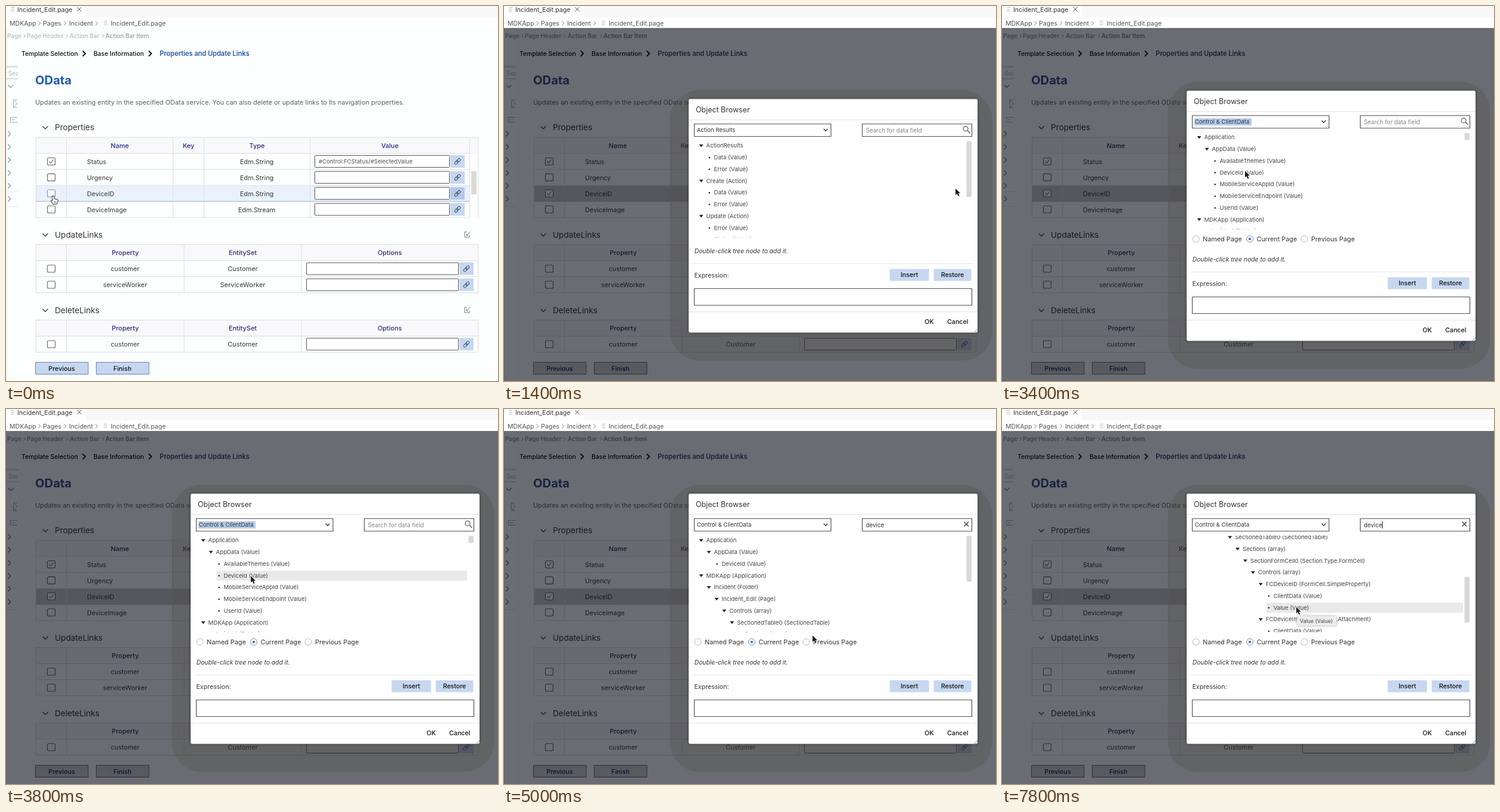
An HTML page with a canvas for the animation above (8 s loop, 826 px wide and 631 px high).

```html
<!DOCTYPE html>
<html lang="en">
<head>
<meta charset="utf-8">
<title>Object Browser</title>
<style>
html, body { margin: 0; width: 100%; height: 100%; overflow: hidden; background: #fff; }
canvas { display: block; }
</style>
</head>
<body>
<canvas id="stage" width="826" height="631"></canvas>
<script>
const ctx = document.getElementById('stage').getContext('2d');
const LOOP = 8000, STEP = 200, ROW = 19.75;
const INK = '#383838', PALE = '#c6d7ef', GRID = '#dcdde3';
// Accents lose most of their colour while the page is dimmed.
const BRIGHT = { head: '#2a2b86', title: '#1f5ab0', step: '#1f5ab0', arrow: '#6f9bc9', row: '#e9f2fc',
  button: PALE, edge: '#6685b8', label: '#111', crumb: '#bcc5c6', lastCrumb: '#a0a9aa' };
const DIMMED = { head: '#30304a', title: '#36507f', step: '#334766', arrow: '#6f747a', row: '#cdcbc8',
  button: '#d2d3d0', edge: '#6c6c6c', label: '#10205c', crumb: '#90979a', lastCrumb: '#7c8486' };
let look = BRIGHT;

// ---------- drawing helpers ----------
function text(str, x, y, size = 10.85, color = INK, style = '400', align = 'left') {
  ctx.font = `${style} ${size}px Inter, sans-serif`;
  ctx.fillStyle = color;
  ctx.textAlign = align;
  ctx.fillText(str, x, y + size * 0.36);
}
function fill(x, y, w, h, color) {
  ctx.fillStyle = color;
  ctx.fillRect(x, y, w, h);
}
function box(x, y, w, h, border, color, radius = 0, width = 1) {
  ctx.beginPath();
  ctx.roundRect(x + 0.5, y + 0.5, w - 1, h - 1, radius);
  if (color) { ctx.fillStyle = color; ctx.fill(); }
  if (border) { ctx.strokeStyle = border; ctx.lineWidth = width; ctx.stroke(); }
}
function line(points, color, width = 1) {
  ctx.beginPath();
  for (let i = 0; i < points.length; i += 2) ctx.lineTo(points[i], points[i + 1]);
  ctx.strokeStyle = color;
  ctx.lineWidth = width;
  ctx.stroke();
}
function shape(points, color, outline) {
  ctx.beginPath();
  for (let i = 0; i < points.length; i += 2) ctx.lineTo(points[i], points[i + 1]);
  ctx.closePath();
  if (outline) { ctx.strokeStyle = outline; ctx.lineWidth = 2; ctx.stroke(); }
  ctx.fillStyle = color;
  ctx.fill();
}
const chevronRight = (x, y, s, color, w) => line([x - s / 2, y - s, x + s / 2, y, x - s / 2, y + s], color, w);
const chevronDown = (x, y, s, color, w) => line([x - s, y - s / 2, x, y + s / 2, x + s, y - s / 2], color, w);

function linkButton(x, y, bg = PALE, ink = '#3b4a63') {
  fill(x, y - 10.5, 24, 21, bg);
  ctx.save();
  ctx.translate(x + 12, y);
  ctx.rotate(-Math.PI / 4);
  box(-6.5, -2.5, 8, 5, ink, null, 2.2);
  box(-1.5, -2.5, 8, 5, ink, null, 2.2);
  ctx.restore();
}
function checkbox(y, checked, border = '#666') {
  box(69, y - 6.5, 14, 13, border, '#fff', 2, 1.1);
  if (checked) line([72.5, y, 75, y + 2.8, 79.5, y - 3.2], '#777', 1.3);
}

// ---------- wizard page ----------
function grid(y, rows, columns, titles) {
  const bottom = y + 27 * (rows + 1);
  fill(50, y, 742, 27, '#f9f9fc');
  for (let i = 0; i <= rows + 1; i++) line([50, y + 27 * i, columns.at(-1), y + 27 * i], GRID);
  for (const x of columns) line([x, y, x, bottom], GRID);
  line([columns.at(-1), y, 792.5, y, 792.5, bottom], GRID);
  titles.forEach((title, i) => text(title, (columns[i + 1] + columns[i + 2]) / 2, y + 14, 10.95, look.head, '500', 'center'));
}
function section(title, y) {
  chevronDown(66, y, 4.5, '#444', 1.3);
  text(title, 82, y, 13.6, '#333');
}
function linkSection(title, y, names) {
  section(title, y);
  line([774, y - 5, 770, y - 5, 770, y + 4, 778, y + 4, 778, y + 1], '#777');
  line([779, y - 5, 773, y + 1, 776, y + 1], '#777');
  line([773, y - 2, 773, y + 1], '#777');
  grid(y + 16.5, names.length, [50.5, 101.5, 299, 496, 792.5], ['Property', 'EntitySet', 'Options']);
  names.forEach((name, i) => {
    const cy = y + 57 + 27 * i;
    checkbox(cy, false);
    text(name, 200, cy + 0.5, 10.85, INK, '400', 'center');
    text(name[0].toUpperCase() + name.slice(1), 397.5, cy + 0.5, 10.95, INK, '400', 'center');
    box(504, cy - 10.5, 256, 21, '#555', '#fff', 1);
    linkButton(761, cy);
  });
}
function sidebar() {
  fill(0, 37, 20, 594, '#fbffff');
  for (const y of [100, 312, 337]) line([0, y + 0.5, 20, y + 0.5], '#e3e8ea');
  line([20, 102.5, 0.5, 102.5, 0.5, 122.5, 20, 122.5], '#b9bdbf');
  ctx.save();
  ctx.beginPath();
  ctx.rect(0, 100, 20, 40);
  ctx.clip();
  text('Search', 4, 113, 10, '#b5b5b5');
  ctx.restore();
  chevronDown(8, 135, 4.5, look.arrow, 1.2);
  line([19, 158, 12.5, 158, 12.5, 171, 19, 171], '#a3aab0');
  line([13, 158, 19, 164, 13, 171], '#a3aab0');
  line([19, 187.5, 7.5, 187.5, 7.5, 195.5, 19, 195.5], '#a3aab0');
  line([10, 191.5, 15, 191.5], '#a3aab0');
  for (const y of [215, 237, 259, 281, 302.5, 324.5]) chevronRight(5.5, y, 4.5, look.arrow, 1.2);
}
function editorTop() {
  fill(0, 0, 826, 37, '#fff');
  fill(134, 0, 692, 19, '#f8f8f8');
  for (const [x, y] of [[8, 6], [164, 29]])
    for (const dy of [-3, 0, 3]) line([x, y + dy - 0.5, x + 6, y + dy - 0.5], '#bbb');
  text('Incident_Edit.page', 19, 5.7, 10.6, '#333');
  line([119.5, 2, 126.5, 9], '#444');
  line([126.5, 2, 119.5, 9], '#444');
  const crumbs = [['MDKApp', 6, 56], ['Pages', 62, 99], ['Incident', 106, 152], ['Incident_Edit.page', 176, 0]];
  for (const [name, x, arrow] of crumbs) {
    text(name, x, 29, 10.55, '#555');
    if (arrow) chevronRight(arrow, 29, 3.5, '#777');
  }
}
function wizard(t) {
  look = t >= 1400 ? DIMMED : BRIGHT;
  fill(0, 0, 826, 631, '#fdfefe');
  fill(0, 37, 826, 28, '#fbfffe');
  sidebar();
  fill(0, 37, 1, 594, '#f4e8d4');
  const trail = [['Page', 2, 31], ['Page Header', 35, 102], ['Action Bar', 107, 163], ['Action Bar Item', 167, 0]];
  for (const [name, x, arrow] of trail) {
    text(name, x, 50.5, 9.9, arrow ? look.crumb : look.lastCrumb, '600');
    if (arrow) chevronRight(arrow, 50.5, 2.8, look.lastCrumb);
  }
  text('Template Selection', 26, 80, 10.4, '#111', '500');
  chevronRight(131, 80, 4.5, '#111', 1.8);
  text('Base Information', 147, 80, 10.45, '#111', '500');
  chevronRight(242, 80, 4.5, '#111', 1.8);
  text('Properties and Update Links', 258, 80, 11.05, look.step, '600');
  text('OData', 49, 125.2, 20.2, look.title, '700');
  text('Updates an existing entity in the specified OData service. You can also delete or update links to its navigation properties.',
    49, 162, 10.9, '#5f5f5f');

  section('Properties', 204.5);
  fill(50, 302, 728, 27, look.row);
  grid(221, 4, [50.5, 101.5, 280.5, 332.5, 510.5, 778.5], ['Name', 'Key', 'Type', 'Value']);
  line([50, 328.5, 778, 328.5], '#a9bcd6');
  ['Status', 'Urgency', 'DeviceID', 'DeviceImage'].forEach((name, i) => {
    const y = 261.5 + 26.9 * i, active = i === 2;
    checkbox(y, i === 0 || (active && t >= 200), active && t < 400 ? '#6f90bd' : '#666');
    text(name, 136, y + 0.5);
    text(i < 3 ? 'Edm.String' : 'Edm.Stream', 421, y + 0.5, 10.95, INK, '400', 'center');
    box(518, y - 10.5, 227, 21, '#555', '#fff', 1);
    if (active && t === 1200) linkButton(746, y, '#1f56a8', '#fff');
    else linkButton(746, y, active ? '#b4c9e8' : PALE);
  });
  text('#Control:FCStatus/#SelectedValue', 525, 262, 9.6, '#555');
  fill(781, 278, 9, 39, '#d9d9d9');
  linkSection('UpdateLinks', 385, ['customer', 'serviceWorker']);
  linkSection('DeleteLinks', 512, ['customer']);
  for (const [name, x] of [['Previous', 49], ['Finish', 151]]) {
    box(x, 599, 89.5, 21, look.edge, look.button);
    text(name, x + 44.5, 610, 10.7, look.label, '500', 'center');
  }
}

// ---------- object browser ----------
// Tree entries are "depth label"; a trailing ":" marks an expanded node.
const resultTree = ['0 ActionResults:', '1 Data (Value)', '1 Error (Value)', '0 Create (Action):', '1 Data (Value)', '1 Error (Value)',
  '0 Update (Action):', '1 Error (Value)', '1 Status (Value)'];
const clientTree = ['0 Application:', '1 AppData (Value):', '2 AvailableThemes (Value)', '2 DeviceId (Value)',
  '2 MobileServiceAppId (Value)', '2 MobileServiceEndpoint (Value)', '2 UserId (Value)', '0 MDKApp (Application):',
  '1 Incident (Folder):'];
const filteredTree = ['0 Application:', '1 AppData (Value):', '2 DeviceId (Value)', '0 MDKApp (Application):',
  '1 Incident (Folder):', '2 Incident_Edit (Page):', '3 Controls (array):', '4 SectionedTable0 (SectionedTable):',
  '5 Sections (array):', '6 SectionFormCell0 (Section.Type.FormCell):', '7 Controls (array):',
  '8 FCDeviceID (FormCell.SimpleProperty):', '9 ClientData (Value)', '9 Value (Value)',
  '8 FCDeviceImage (FormCell.Attachment):', '9 ClientData (Value)', '9 Value (Value)'];
const choices = ['OData Functions Result', 'Action Results', 'OData Objects', 'Control & ClientData', 'Rules',
  'Global Data', 'Array Initialization', 'i18n Objects', 'Expressions'];

function tree(items, top, scroll, hovered) {
  ctx.save();
  ctx.beginPath();
  ctx.rect(312, top + 71, 464, 162.5);
  ctx.clip();
  items.forEach((item, i) => {
    const depth = +item[0], open = item.endsWith(':');
    const x = 339.6 + 12.9 * depth, y = top + 79 + ROW * i - scroll;
    if (i === hovered) fill(x - 12, y - 8.5, 774 - x + 12, 17, '#e9e9e9');
    if (open) shape([x - 12, y - 2, x - 5, y - 2, x - 8.5, y + 2.5], '#222');
    else box(x - 9.5, y - 1.5, 3.6, 3.6, null, '#222', 1.3);
    text(item.slice(2).replace(/:$/, ''), x, y, 9.6, '#444');
  });
  ctx.restore();
}
function radio(x, y, label, on) {
  ctx.beginPath();
  ctx.arc(x, y, 5.5, 0, 7);
  ctx.strokeStyle = on ? '#6a8fc0' : '#b5b5b5';
  ctx.lineWidth = 1;
  ctx.stroke();
  if (on) box(x - 2.5, y - 2.5, 5, 5, null, '#2c62ad', 2);
  text(label, x + 11.5, y, 10.85, '#333');
}
function searchBox(t, top) {
  const typed = 'device'.slice(0, t < 4400 ? 0 : t < 4600 ? 3 : 6);
  box(601, top + 42, 185, 22, '#555', '#fff', 0, 1.2);
  text(typed || 'Search for data field', 607.5, top + 53, 9.8, typed ? '#333' : '#858585');
  if (typed) {
    line([772.5, top + 48, 780, top + 55.5], '#333', 1.3);
    line([780, top + 48, 772.5, top + 55.5], '#333', 1.3);
  } else {
    ctx.beginPath();
    ctx.arc(775, top + 50.5, 4, 0, 7);
    ctx.strokeStyle = '#666';
    ctx.lineWidth = 1.3;
    ctx.stroke();
    line([778, top + 53.5, 782.5, top + 58], '#666', 1.6);
  }
  const caret = (t >= 4200 && t < 4800) || (t >= 5400 && t < 6400) || (t >= 7000 && t < 7400) || t >= 7800;
  if (caret) fill(typed ? 638 : 607, top + 47, 1, 12, '#222');
}
function dropdown(t) {
  ctx.save();
  ctx.shadowColor = 'rgba(0,0,0,.5)';
  ctx.shadowBlur = 8;
  ctx.shadowOffsetY = 3;
  fill(320, 220, 229, 141, '#fff');
  ctx.restore();
  box(319.5, 219.5, 230, 142, '#444');
  fill(321, 237 + (t >= 2800 ? 30.8 : 0), 227, 15, '#a8c1e3');
  choices.forEach((choice, i) => text(choice, 325, 229.5 + 15.4 * i, 9.6, '#222'));
}
function scrollAt(t) {
  return [[6000, 143.5], [5800, 115], [5600, 80], [5400, 35]].find(([from]) => t >= from)?.[1] ?? 0;
}
function dialog(t) {
  const chosen = t >= 3000, filtered = t >= 4800;
  const top = chosen ? 142 : 156, bottom = chosen ? 563 : 549;
  fill(0, 37, 826, 594, 'rgba(0,4,16,.58)');
  box(278, top - 15, 542, bottom - top + 63, null, 'rgba(80,76,70,.3)', 50);
  ctx.save();
  ctx.shadowColor = 'rgba(0,0,0,.4)';
  ctx.shadowBlur = 5;
  box(309.5, top, 486, bottom - top + 1, null, '#fff', 3);
  ctx.restore();
  text('Object Browser', 322, top + 18.5, 12.45, '#333');
  line([310, top + 35.5, 795, top + 35.5], '#e3e3e3');

  const scroll = scrollAt(t);
  const hovered = t >= 6000 ? 13 : t === 3800 ? 3 : -1;
  tree(filtered ? filteredTree : chosen ? clientTree : resultTree, top, scroll, hovered);
  const thumb = filtered ? 78 : chosen ? 13 : 95;
  box(776, top + 71 + scroll * 0.481, 9.5, thumb, null, '#d8d8dc', 2);

  box(319, top + 42, 230.5, 22, '#555', '#fff', 0, 1.2);
  const choice = chosen ? 'Control & ClientData' : 'Action Results';
  if (t >= 2200 && t < 4200) fill(323, top + 47, chosen ? 96 : 67, 12, '#b4cbea');
  text(choice, 323.7, top + 53, 9.6, '#333');
  chevronDown(540, top + 52.5, 3.3, '#333', 1.4);
  searchBox(t, top);

  if (chosen) {
    radio(325.5, 392, 'Named Page', false);
    radio(416, 392, 'Current Page', true);
    radio(507.5, 392, 'Previous Page', false);
  }
  text('Double-click tree node to add it.', 319.7, bottom - 137, 10.3, '#333', 'italic 400');
  line([317, bottom - 115.5, 788, bottom - 115.5], '#e6e6e6');
  text('Expression:', 319.5, bottom - 96, 10.6, '#333');
  for (const [label, x, w] of [['Insert', 647, 67], ['Restore', 721, 64]]) {
    box(x, bottom - 107, w, 21, null, PALE, 1);
    text(label, x + w / 2, bottom - 96.5, 10.6, '#111', '500', 'center');
  }
  box(319, bottom - 74, 467, 29, '#555', '#fff', 0, 1.2);
  line([310, bottom - 34.5, 795, bottom - 34.5], '#e3e3e3');
  text('OK', 706, bottom - 17.5, 10.8, '#111', '500');
  text('Cancel', 744, bottom - 17.5, 10.7, '#111', '500');
  line([790, bottom, 795, bottom - 5], '#777');
  if (t >= 2200 && !chosen) dropdown(t);
  if (t >= 7000) {
    ctx.save();
    ctx.shadowColor = 'rgba(0,0,0,.35)';
    ctx.shadowBlur = 4;
    box(495, 348, 67, 17, null, '#ececec', 2);
    ctx.restore();
    text('Value (Value)', 500, 356.5, 8.9, '#444');
  }
}

// ---------- pointer ----------
const pointerPath = [[0, 79, 320], [400, 79, 320], [1200, 758, 307], [1400, 758, 307], [2000, 440, 208], [2400, 440, 208],
  [2600, 433, 313], [2800, 405, 274], [3000, 405, 274], [3800, 411, 281], [4200, 650, 193], [4600, 650, 193],
  [5000, 518, 381], [5400, 505, 327], [5800, 505, 327], [6000, 494, 333], [8000, 494, 333]];

function pointer(t) {
  const i = pointerPath.findIndex(([at]) => at > t);
  const [t0, x0, y0] = pointerPath[i - 1], [t1, x1, y1] = pointerPath[i];
  const k = (t - t0) / (t1 - t0), ease = k * k * (3 - 2 * k);
  ctx.save();
  ctx.translate(x0 + (x1 - x0) * ease, y0 + (y1 - y0) * ease);
  if (t < 400 || (t >= 5400 && t < 6000)) {
    ctx.lineJoin = 'round';
    shape([-1, 0, 1, 0, 2, 5, 7, 6, 8, 8, 6, 13, 0, 13, -3, 8, -2, 7, 0, 8], '#fff', '#333');
    line([2.5, 8.5, 2.5, 11.5], '#555');
    line([4.7, 8.5, 4.7, 11.5], '#555');
  } else {
    shape([0, 0, 0, 11, 2.5, 8.8, 4.5, 13, 6.5, 12.2, 4.7, 8, 8, 8], '#1b1b26', '#fff');
  }
  ctx.restore();
}

function frame(now) {
  const t = Math.floor((now % LOOP) / STEP) * STEP;
  wizard(t);
  if (t >= 1400) dialog(t);
  editorTop();
  pointer(t);
  requestAnimationFrame(frame);
}
requestAnimationFrame(frame);
</script>
</body>
</html>
```
